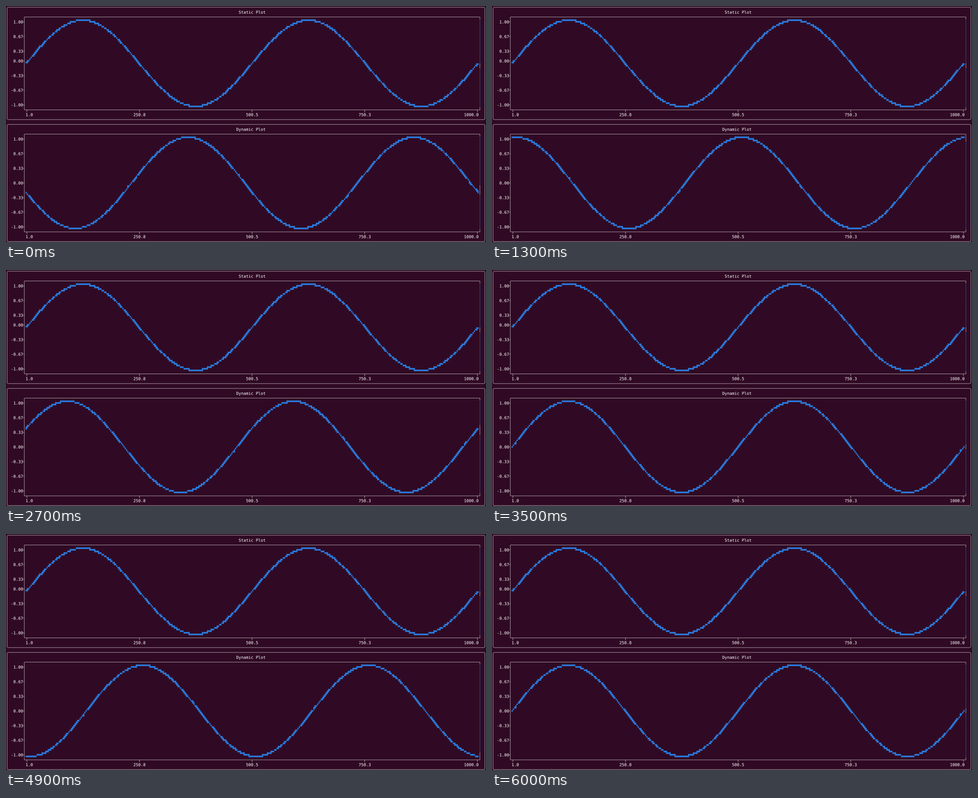
Write a matplotlib script that moves like this. It is 1066 px wide and 526 px high and loops after 6.1 s.

```python
import numpy as np
import matplotlib.pyplot as plt
from matplotlib.animation import FuncAnimation
from matplotlib.collections import LineCollection
from matplotlib.colors import to_rgb
from matplotlib.patches import FancyBboxPatch, PathPatch
from matplotlib.textpath import TextPath
from matplotlib.transforms import Affine2D

W, H, DPI = 1066, 526, 64
BG, FG, BLUE = "#300a24", "#ffffff", "#2a7bde"

# Terminal grid
COLS = 196
CW = W / COLS
CH = 2 * CW
Y0 = 2.6                           # centre of the first text row
LINE = CW / 9                      # stroke width in pixels
LW = LINE * 72 / DPI
LEFT, RIGHT = 7, 193               # columns of the vertical axes
NX = RIGHT - LEFT - 1              # canvas width in cells
FONT = CW / 0.602

N = 1000
FRAMES, STALL = 61, 25
CYCLE = 30                         # phase steps per full turn

fig = plt.figure(figsize=(W / DPI, H / DPI), dpi=DPI, facecolor=BG)
ax = fig.add_axes([0, 0, 1, 1])
ax.axis("off")


def col_x(c):
    return (c + 0.5) * CW


def row_y(r):
    return Y0 + r * CH


def rule_y(r):
    """Horizontal strokes sit half a stroke below the row centre."""
    return row_y(r) + LINE / 2


def line(x, y):
    ax.plot(x, y, color=FG, lw=LW, solid_capstyle="butt",
            solid_joinstyle="miter", snap=False)


def write(col, row, text):
    glyphs = TextPath((0, 0), text, size=FONT,
                      prop={"family": "DejaVu Sans Mono"})
    place = Affine2D().scale(1, -1).translate(col * CW, row_y(row) + 3.6)
    ax.add_patch(PathPatch(place.transform_path(glyphs), fc=FG, lw=0,
                           snap=False))


def coverage(n, start, step, size):
    """Share of each pixel that is covered by each of n equal bins."""
    lo = start + step * np.arange(n)
    px = np.arange(size)[:, None]
    return np.clip(np.minimum(px + 1, lo + step) - np.maximum(px, lo), 0, 1)


def to_bins(v, bins):
    lo, hi = v.min(), v.max()
    return np.floor(0.5 + (bins - 1) * (v - lo) / (hi - lo)).astype(int)


def wave(step):
    return np.sin(4 * np.pi * np.arange(N) / (N - 1) + 2 * np.pi * step / CYCLE)


class Plot:
    """Framed terminal plot, each cell split into 2 by 3 blocks."""

    def __init__(self, title, row, ny):
        self.ny = ny
        self.first = row + 3
        bottom = self.first + ny
        self.top = row_y(self.first) - CH / 2
        self.draw_frame(title, row, bottom)
        self.draw_ticks(bottom)

        self.cx = coverage(2 * NX, (LEFT + 1) * CW, CW / 2, W)
        self.cy = coverage(3 * ny, self.top, CH / 3, H)
        self.rgba = np.zeros((H, W, 4))
        self.rgba[..., :3] = to_rgb(BLUE)
        self.image = ax.imshow(self.rgba, extent=(0, W, H, 0), aspect="auto",
                               interpolation="nearest", zorder=3)

        x = col_x(RIGHT)
        edges = self.top + CH * np.arange(ny + 1)
        segs = [[(x, a), (x, b)] for a, b in zip(edges[:-1], edges[1:])]
        self.side = LineCollection(segs, linewidths=LW, capstyle="butt",
                                   snap=False)
        ax.add_collection(self.side)

    def draw_frame(self, title, row, bottom):
        x0, x1 = col_x(0), col_x(COLS - 1)
        y0, y1 = rule_y(row), rule_y(bottom + 2)
        ax.add_patch(FancyBboxPatch(
            (x0, y0), x1 - x0, y1 - y0, fc="none", ec=FG, lw=LW, snap=False,
            boxstyle="round,pad=0,rounding_size=2.4"))
        write(106 - len(title), row + 1, title)

        left, right = col_x(LEFT), col_x(RIGHT)
        up, down = rule_y(row + 2), rule_y(bottom)
        end = self.top + self.ny * CH
        line([right, right, left, left, right, right],
             [self.top, up, up, down, down, end])

    def draw_ticks(self, bottom):
        for v in np.arange(3, -4, -1) / 3:
            up = int(np.floor(0.5 + (self.ny - 1) * (1 + v) / 2 + 1e-9))
            row = self.first + self.ny - 1 - up
            label = f"{v:.2f}"
            write(LEFT - len(label), row, label)
            line([LEFT * CW, col_x(LEFT)], [rule_y(row)] * 2)

        for t in np.arange(5) / 4:
            col = LEFT + 1 + round(t * (NX - 1))
            label = f"{1 + t * (N - 1) + 1e-9:.1f}"
            start = np.clip(col - len(label) // 2, LEFT + 1, RIGHT - len(label))
            write(start, bottom + 1, label)
            line([col_x(col)] * 2, [rule_y(bottom), row_y(bottom) + CH / 2])

    def show(self, y):
        rows = 3 * self.ny
        mask = np.zeros((rows, 2 * NX))
        mask[rows - 1 - to_bins(y, rows), to_bins(np.arange(N), 2 * NX)] = 1
        self.rgba[..., 3] = np.clip(self.cy @ mask @ self.cx.T, 0, 1)
        self.image.set_data(self.rgba)
        # The curve colour leaks onto the axis where the last cell is empty
        filled = mask[:, -2:].reshape(self.ny, -1).any(axis=1)
        self.side.set_color([FG if f else BLUE for f in filled])


def phase_step(i):
    """Uneven playback speed, with one held picture."""
    if i == STALL:
        i -= 1
    return round(float(np.interp(i, [0, 13, 27, 35, 44, 54, 60],
                                 [16, 67, 122, 150, 184, 219, 240])))


static = Plot("Static Plot", 0, 18)
dynamic = Plot("Dynamic Plot", 24, 19)
static.show(wave(0))
ax.set(xlim=(0, W), ylim=(H, 0))


def update(i):
    dynamic.show(wave(phase_step(i) % CYCLE))
    return dynamic.image, dynamic.side


anim = FuncAnimation(fig, update, frames=FRAMES, interval=100, repeat=True)
plt.show()
```
